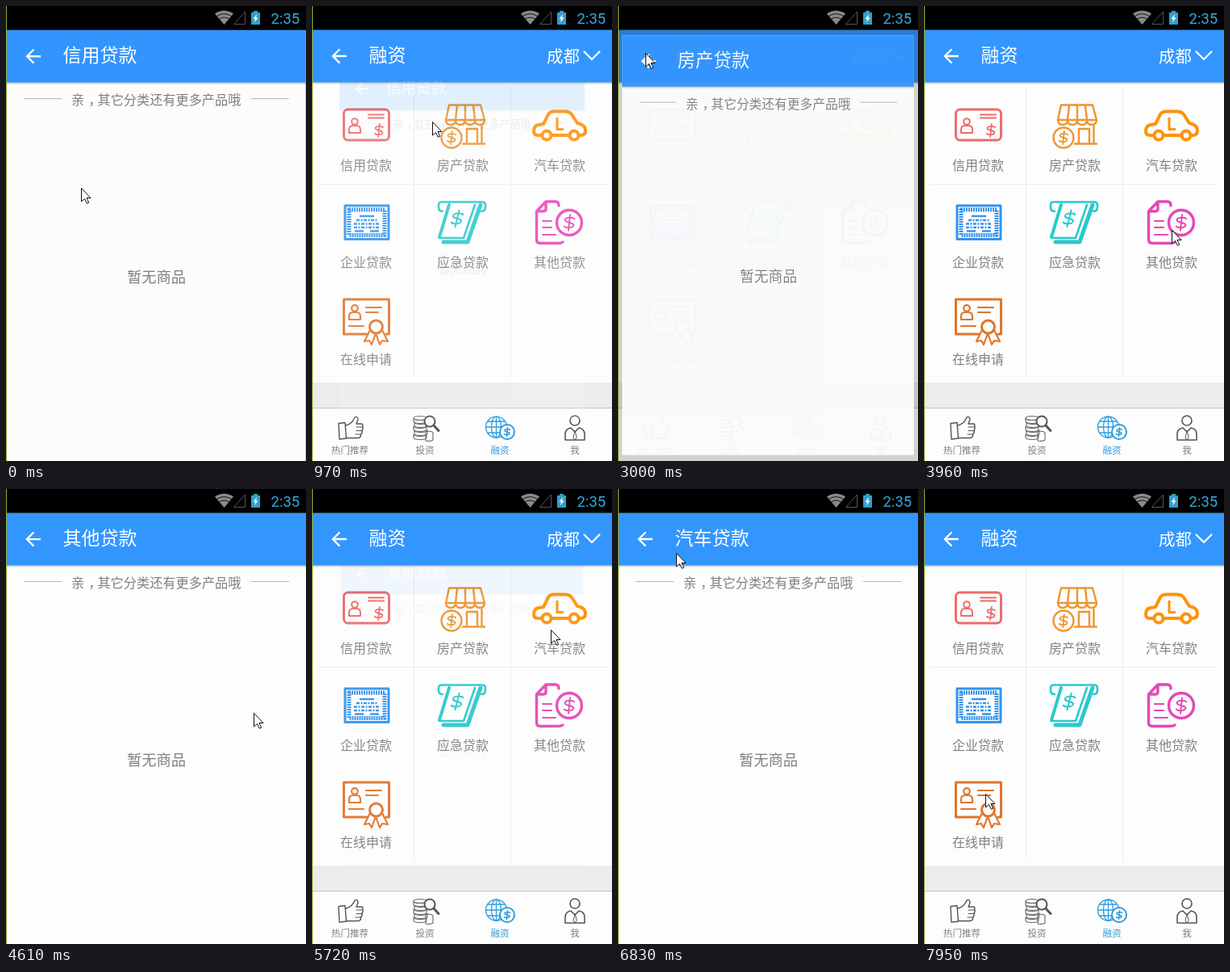
Animation of 372x563 px, one loop 8000 ms. Source, as an HTML page:

```html
<!DOCTYPE html>
<html lang="zh-CN">
<head>
<meta charset="utf-8">
<style>
  html, body { margin: 0; width: 100%; height: 100%; overflow: hidden; background: #000; }
  svg { display: block; width: 372px; height: 563px; }
  text { font-family: "Noto Sans CJK SC", "Noto Sans CJK", sans-serif; font-weight: 350; white-space: pre; }
  .clock { font-family: Roboto, sans-serif; font-weight: 400; }
  .icon { fill: none; stroke-linecap: round; stroke-linejoin: round; }
</style>
</head>
<body>
<svg id="stage" viewBox="0 0 372 563"></svg>
<script>
const LOOP = 8000, TICK = 137, FIRST_TICK = 85, FADE = 300, MOVE = 500;
const BLUE = '#3396ff', GREY = '#808080', PAPER = '#fdfdfd', RULE = '#eee';
const TOP = 29.5, BAR = 65; // status bar height, title bar height

// Text placed by its left edge and the middle of its glyph box.
const label = (x, middle, size, fill, text) =>
  `<text x="${x}" y="${middle + size * .38}" font-size="${size}" fill="${fill}">${text}</text>`;
const icon = (color, width, body) =>
  `<g class="icon" stroke="${color}" stroke-width="${width}">${body}</g>`;
const path = (d, extra = '') => `<path d="${d}" ${extra}/>`;
const rect = (x, y, w, h, fill) =>
  `<rect x="${x}" y="${y}" width="${w}" height="${h}" fill="${fill}"/>`;
const frame = (x, y, w, h, extra = '') =>
  `<rect x="${x}" y="${y}" width="${w}" height="${h}" ${extra}/>`;
const circle = (x, y, r, extra = '') => `<circle cx="${x}" cy="${y}" r="${r}" ${extra}/>`;
const dollar = (x, y, scale, width = 1.8, slant = -6) =>
  `<g transform="translate(${x} ${y}) skewX(${slant}) scale(${scale})" stroke-width="${width / scale}">` +
  path('M5-4C3-6-5-6-5-2.8S5-.4 5 2.8-3 6-5 4M0-8.5V8.5') + '</g>';
const person = (x, y) => circle(x, y, 3.8) +
  path(`M${x - 7} ${y + 14}v-4q0-5 5-5h4q5 0 5 5v4z`);

const header = title =>
  rect(0, TOP, 372, BAR, BLUE) +
  [.25, .09, .03].map((shade, i) => rect(0, TOP + BAR + i, 372, 1, `rgba(0,0,0,${shade})`)).join('') +
  path('M20 11H7.83l5.59-5.59L12 4l-8 8 8 8 1.41-1.41L7.83 13H20z',
    'fill="#fff" transform="translate(19.5 48) scale(1.17)"') +
  label(70.5, 60.5, 23, '#fff', title);

const credit = icon('#ee6b6b', 2,
  frame(39.5, 128, 56, 38, 'rx="5" stroke-width="3"') +
  person(53, 143) + path('M70 134.5H89M70 138.5H89') + dollar(83, 154, .95));

const awning = path('M170 122.5H209L214 141' + 'q0 6-6 6t-6-6'.repeat(4) + 'z');
const house = icon('#ee9530', 2.4,
  awning + path('M166 141H214M180 123L178 141M190 123V141M200 123L202 141') +
  path('M192 170V152H205V170M210.5 149V170M187 170.5H214') +
  circle(173, 163, 12.5) + dollar(173, 163, .95));

const car = icon('#ff9208', 4,
  path('M284 160H280Q275 160 275 155 275 148 281 147L287 146 293 134Q295 130.5 300 130.5H314Q319 130.5 322 134L329 145Q339 147 339 154 339 160 333 160H332M298 160H318') +
  circle(291, 160, 5.5) + circle(325, 160, 5.5) +
  path('M304 138V152.5H312', 'stroke-width="3" stroke-linecap="butt" stroke-linejoin="miter"'));

const certificate = icon('#3393ec', 2.4,
  frame(41, 247, 54, 41.5, 'stroke-width="3"') +
  '<g stroke-linecap="butt">' +
  frame(46, 252, 44, 31.5, 'stroke-width="5" stroke-dasharray="2 1"') +
  path('M59 260H77') +
  path('M55 265H81M52 269.5H84M52 274H84', 'stroke-dasharray="4 1.5 2 1.5"') +
  path('M53 278.5H64M72 278.5H83') + '</g>');

const cash = icon('#2bc9cb', 2.6,
  path('M162 254Q157 254 157 249V246Q157 242.5 161 242.5H211Q215 242.5 215 246V249Q215 254 210 254') +
  path('M170 246L158 286', 'stroke-width="4"') + path('M158 287H188L202 246') +
  path('M163 292H193L209 246', 'stroke-width="5"') +
  dollar(180, 263, 1.2, 2, -14));

const other = icon('#e548b7', 3.4,
  path('M311 292Q309 293.5 306 293.5H283Q278.5 293.5 278.5 289V254L290 242H302Q306 242 306 247M279 254H287Q290 254 290 251V243') +
  path('M286 266H297M286 274H297M286 283H302', 'stroke-width="2"') +
  circle(319, 268, 15.5) + dollar(319, 268, 1.15, 2));

const apply = icon('#e1752c', 2.2,
  path('M68 406H39.5V363H95.5V406H92', 'stroke-width="3"') +
  person(53, 374) + path('M67 373H86M67 379H82M46 396H64') +
  path('M72 401L65 415 71 414 74 419 79 405 84 419 87 414 94 415 87 401') +
  circle(79.5, 397, 8, `fill="${PAPER}" stroke-width="3"`));

const thumb = icon('#555', 1.4,
  path('M33 516.5L41 515.5 42.5 535 34 536Z') +
  path('M42 519Q50 517 53 509 57 507 57 512L55 517H61Q64 517 62.5 520 64 522 62 525 63 528 60.5 530 61 534 57 534.5H43') +
  path('M55 521H62M55 525.5H62M54 530H60', 'stroke-width="1"'));

const coins = [510, 515, 520, 525, 530].map((y, i) =>
  path(`M${126 + i % 2} ${y}a8 2.5 0 0 0 16 0v4a8 2.5 0 0 1-16 0z`)).join('');
const invest = icon('#666', 1.1,
  '<ellipse cx="134" cy="510" rx="8" ry="2.5"/>' + coins +
  path('M150 537v-9a8 2.5 0 0 0-9-2v12q7 1 9-1') +
  circle(146, 514, 6.5, `fill="${PAPER}" stroke="#555" stroke-width="2"`) +
  path('M151 519L157 525.5', 'stroke="#555" stroke-width="3"'));

const finance = icon('#2f9ddd', 1.3,
  circle(228.5, 521, 13) + '<ellipse cx="228.5" cy="521" rx="6" ry="13"/>' +
  path('M228.5 508V534M215.5 521H241.5M218 514H239M218 528H239') +
  circle(242, 527, 9, `fill="${PAPER}" stroke-width="2"`) + dollar(242, 527, .65, 1.5));

const profile = icon('#555', 1.6,
  circle(326, 513, 6) +
  path('M314 537V530Q314 523 321 522L326 527 331 522Q338 523 338 530V537Z') +
  path('M326 526L324 534 326 537 328 534Z', 'stroke-width="1"'));

const products = ['信用贷款', '房产贷款', '汽车贷款', '企业贷款', '应急贷款', '其他贷款', '在线申请'];
const tabs = ['热门推荐', '投资', '融资', '我'];
const TAB_SIZE = 11.6;

const home = rect(0, TOP, 372, 534, PAPER) + header('融资') +
  label(291, 62, 20.5, '#fff', '成都') +
  icon('#fff', 2.2, path('M337.5 56.5L347 66 356.5 56.5')) +
  rect(126, 98, 1, 362, RULE) + rect(246, 98, 1, 362, RULE) + rect(7, 220, 359, 1, RULE) +
  products.map((name, i) =>
    label(35 + i % 3 * 120, 197 + Math.floor(i / 3) * 120, 16, GREY, name)).join('') +
  credit + house + car + certificate + cash + other + apply +
  rect(0, 466, 372, 31, '#ececec') + rect(0, 497, 372, 1, '#c2c2c2') +
  thumb + invest + finance + profile +
  tabs.map((name, i) =>
    label(47 + i * 93 - name.length * TAB_SIZE / 2, 550, TAB_SIZE,
      name === '融资' ? '#2f9ddd' : GREY, name)).join('');

const page = rect(0, TOP, 372, 534, PAPER) +
  header('<tspan id="title"></tspan>') +
  rect(22, 114, 47, 1, '#b5b5b5') + rect(304, 114, 47, 1, '#b5b5b5') +
  label(81, 116, 16.2, GREY, '亲<tspan dx="5">，</tspan><tspan dx="-5">其它分类还有更多产品哦</tspan>') +
  label(150, 335.5, 18.3, GREY, '暂无商品');

const status = rect(0, 0, 372, TOP, '#000') +
  path('M270.5 23L259 9.5Q270.5 2 282 9.5Z', 'fill="#8a8a8a"') +
  icon('#111', 1, path('M261.5 12.5Q270.5 6.5 279.5 12.5M264.5 16Q270.5 12 276.5 16')) +
  path('M282.5 22.5H296.5V7Z', 'fill="none" stroke="#555"') +
  path('M307 6H312V8H315V23H304V8H307Z', 'fill="#329fc9"') +
  path('M311 10L306.5 16H309L308 20.5 312.5 14.5H310Z', 'fill="#fff"') +
  '<text class="clock" x="328.5" y="22" font-size="18.5" fill="#33a9dc">2:35</text>';

const pointer = path('M.5.5V17L4.5 13.5 7.3 19.3 9.7 18.3 7 12.5H12Z',
  'fill="#fff" stroke="#111"');

document.getElementById('stage').innerHTML =
  `<g id="home">${home}</g><g id="page">${page}</g>${status}` +
  rect(0, 0, 1, 563, '#8fb03a') + `<g id="pointer">${pointer}</g>`;

const [homeEl, pageEl, titleEl, pointerEl] =
  ['home', 'page', 'title', 'pointer'].map(id => document.getElementById(id));

const visits = [
  { title: '信用贷款', open: -FADE, close: 620 },
  { title: '房产贷款', open: 1522, close: 2850 },
  { title: '其他贷款', open: 4330, close: 5408 },
  { title: '汽车贷款', open: 6230, close: 7380 }
];

// Each gesture starts at its time and eases to its point.
const rest = { x: 93, y: 225 }, back = { x: 34, y: 58 };
const gestures = [
  { at: 110, ...back },
  { at: 700, x: 178, y: 164 },
  { at: 1229, x: 190, y: 236 },
  { at: 2000, ...back },
  { at: 3300, x: 307, y: 277 },
  { at: 4700, ...back },
  { at: 5400, x: 313, y: 182 },
  { at: 5900, x: 273, y: 188 },
  { at: 6570, ...back },
  { at: 7390, x: 76, y: 377 }
];

const clamp = v => Math.min(1, Math.max(0, v));
const easeOut = u => 1 - (1 - clamp(u)) ** 3;

const pointerAt = t => gestures.reduce((from, to) => {
  const k = easeOut((t - to.at) / MOVE);
  return { x: from.x + (to.x - from.x) * k, y: from.y + (to.y - from.y) * k };
}, rest);

function pageAt(t) {
  const visit = visits.find(v => t >= v.open && t < v.close + FADE);
  if (!visit) return { title: '', alpha: 0, scale: 1, homeAlpha: 1 };
  const { title, open, close } = visit;
  if (t < close) {
    const shown = easeOut((t - open) / FADE);
    return { title, alpha: shown, scale: .8 + .2 * shown, homeAlpha: 1 - shown };
  }
  const u = (t - close) / FADE;
  return { title, alpha: 1 - u ** 3, scale: 1 - .2 * u * u, homeAlpha: clamp(.7 + .35 * u) };
}

function draw(now) {
  // The screen refreshes in even, coarse ticks.
  const t = FIRST_TICK + Math.floor((now % LOOP - FIRST_TICK) / TICK) * TICK;
  const { title, alpha, scale, homeAlpha } = pageAt(t);
  const { x, y } = pointerAt(t);
  homeEl.setAttribute('opacity', homeAlpha);
  pageEl.setAttribute('opacity', alpha);
  pageEl.setAttribute('transform',
    `translate(186 281.5) scale(${scale}) translate(-186 -281.5)`);
  if (titleEl.textContent !== title) titleEl.textContent = title;
  pointerEl.setAttribute('transform', `translate(${Math.round(x)} ${Math.round(y)})`);
}

const start = performance.now();
function loop() {
  draw(performance.now() - start);
  requestAnimationFrame(loop);
}
loop();
</script>
</body>
</html>
```
